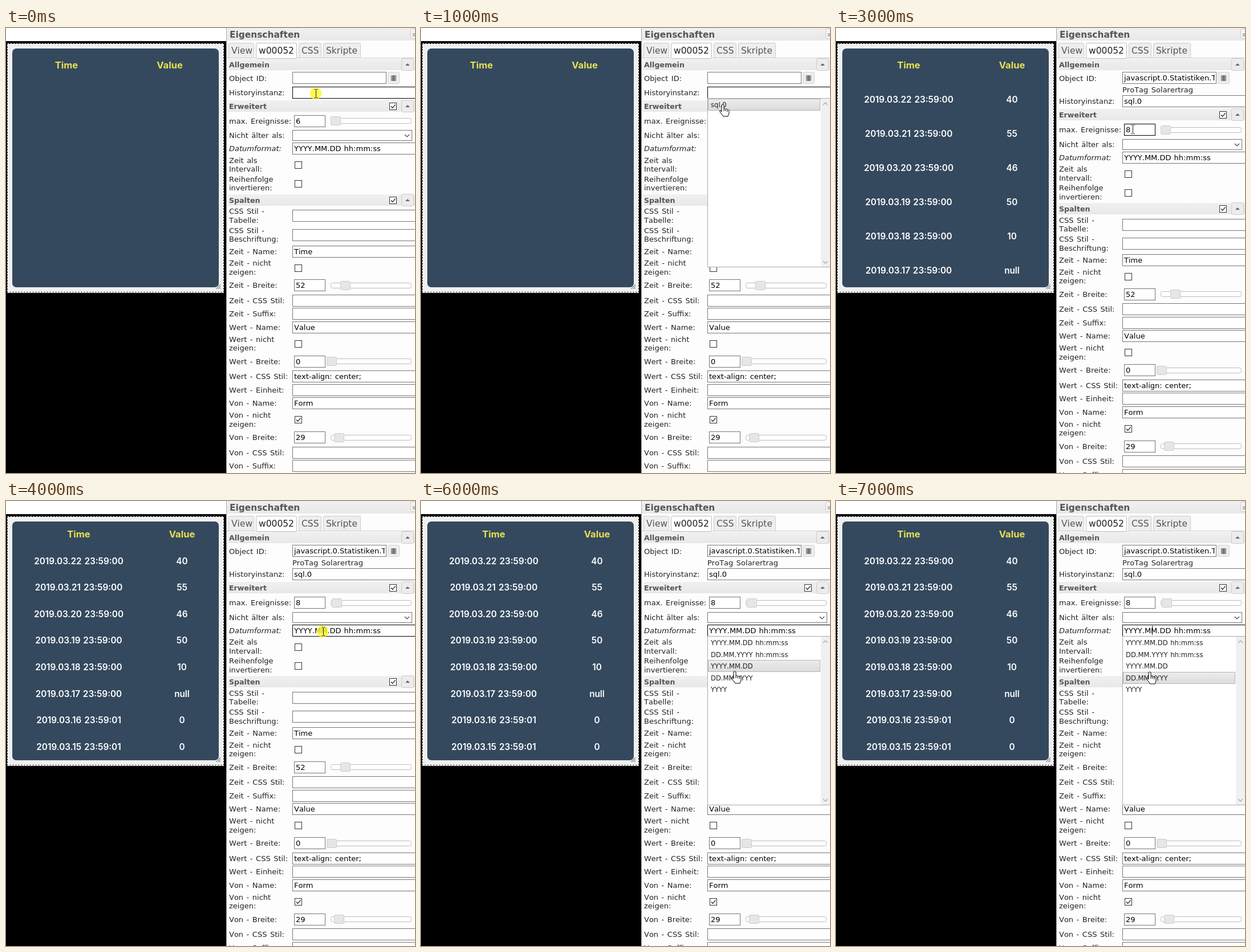
These frames come from a looping animation (717 px wide and 781 px high, 8 s). An HTML page:

```html
<!DOCTYPE html>
<html lang="de">
<head>
<meta charset="utf-8">
<title>Eigenschaften</title>
<style>
html, body { margin: 0; width: 100%; height: 100%; overflow: hidden; background: #000; }
svg { display: block; width: 717px; height: 781px; }
text { font: 13px "DejaVu Sans", sans-serif; font-kerning: none; fill: #222; word-spacing: 1px; white-space: pre; }
.label { word-spacing: 1.4px; }
.italic { font-style: italic; }
.input { fill: #000; }
.title { font-size: 15.4px; font-weight: bold; fill: #555; }
.section { font-size: 12.6px; font-weight: bold; fill: #555; }
.tab { font-size: 15.5px; fill: #555; }
.active { fill: #212121; }
.item { font-size: 11.6px; }
.cell { font: 600 15.3px Inter, sans-serif; fill: #fff; text-anchor: middle; }
.head { font: 700 16.5px Inter, sans-serif; fill: #e8e052; text-anchor: middle; }
.press { fill: #fcf630; fill-opacity: .8; }
</style>
</head>
<body>
<svg id="stage" viewBox="0 0 717 781"></svg>
<script>
const STEP = 1000;
const FORMATS = ["YYYY.MM.DD hh:mm:ss", "DD.MM.YYYY hh:mm:ss", "YYYY.MM.DD", "DD.MM.YYYY", "YYYY"];
const VALUES = [40, 55, 46, 50, 10, "null", 0, 0];

// One entry per second of the recording
const filled = { id: true, history: "sql.0" };
const eight = { ...filled, max: 8, rows: 8, knob: 571 };
const picking = { ...eight, focus: "date", items: FORMATS, menuY: 238 };
const states = [
  { focus: "history", press: [543, 115], beam: [543, 115] },
  { focus: "history", items: ["sql.0"], menuY: 124, pick: 0, hand: [528, 133] },
  { history: "sql.0", hover: true, beam: [158, 251, "#d9cbb8"] },
  { ...filled, max: 8, rows: 6, focus: "max", beam: [520, 178] },
  { ...eight, focus: "date", press: [555, 229], beam: [556, 229] },
  { ...picking, pick: 0, hand: [552, 269] },
  { ...picking, pick: 2, hand: [549, 298] },
  { ...picking, pick: 3, hand: [549, 299], caret: true }
];

const rect = (x, y, w, h, fill, stroke = "none", r = 0) =>
  `<rect x="${x}" y="${y}" width="${w}" height="${h}" rx="${r}" fill="${fill}" stroke="${stroke}"/>`;
const box = (x, y, w, h, fill, stroke, r) =>
  rect(x + .5, Math.round(y) + .5, w - 1, h - 1, fill, stroke, r);
const path = (d, stroke, fill = "none", width = 1) =>
  `<path d="${d}" fill="${fill}" stroke="${stroke}" stroke-width="${width}"/>`;
const text = (x, y, s, cls = "label") => `<text x="${x}" y="${Math.round(y)}" class="${cls}">${s}</text>`;

// Form controls are placed by their vertical centre
const label = (y, s, cls = "") => {
  const lines = s.split("|");
  return lines.map((line, i) =>
    text(391, y + 4.5 + (i - (lines.length - 1) / 2) * 15.5, line, "label " + cls)).join("");
};
const field = (y, value = "", focus) =>
  box(502, y - 10.5, 232, 21, "#fff", focus ? "#000" : "#767676") + text(505, y + 4.5, value, "input");
const check = (x, y, on) => {
  const mid = Math.round(y);
  return box(x, mid - 6, 13, 13, "#fff", "#333") +
    (on ? path(`M${x + 3} ${mid + .5}l2.6 2.8 5-6`, "#222", "none", 1.3) : "");
};
const slider = (y, value, knob, focus) =>
  box(505, y - 10.5, 55, 21, "#fff", focus ? "#000" : "#767676") + text(508, y + 4.5, value, "input") +
  box(569, y - 5, 142, 10, "#fff", "#bbb", 3) + box(knob, y - 8, 18, 16, "#e6e6e6", "#ccc", 2);
const section = (y, name, toggle) => {
  const mid = Math.round(y);
  return rect(390, mid - 10, 327, 20, "url(#bar)") + text(391, mid + 4.5, name, "section") +
    (toggle ? check(672, mid, true) : "") +
    box(693, mid - 11, 22, 22, "#ececec", "#ccc", 2) + path(`M700 ${mid + 2}h8l-4-4z`, "none", "#666");
};

function board({ rows }) {
  let out = rect(0, 0, 386, 23, "#fff") + rect(2, 27, 380, 438, "#f0eff0") +
    rect(2.5, 27.5, 379, 436, "none", "#000") +
    `<rect x="2.5" y="27.5" width="379" height="436" fill="none" stroke="#fff" stroke-dasharray="3 2"/>` +
    rect(11, 36, 362, 419, "#34495e", "none", 7) +
    path("M368 458l8-8M371 458l5-5M374 458l2-2", "#555");
  const count = rows || 0, gap = count === 8 ? 46.6 : 60;
  const top = count === 8 ? 58.5 : 65, timeX = count ? 127.5 : 106, valueX = count ? 308.5 : 287;
  out += text(timeX, top + 5.5, "Time", "head") + text(valueX, top + 5.5, "Value", "head");
  for (let i = 0; i < count; i++) {
    const y = top + gap * (i + 1) + 5.5;
    out += text(timeX, y, `2019.03.${22 - i} 23:59:0${i > 5 ? 1 : 0}`, "cell") + text(valueX, y, VALUES[i], "cell");
  }
  return out;
}

function header() {
  const tabs = [["View", 390, 45], ["w00052", 438, 72], ["CSS", 513, 40], ["Skripte", 556, 66]];
  return rect(387, 0, 330, 781, "#fdfdfd") + rect(386, 0, 1, 781, "#aaa") +
    rect(387, 0, 330, 22, "url(#bar)") + text(392, 16.5, "Eigenschaften", "title") +
    box(709, 1, 18, 18, "#f4f4f4", "#ccc", 2) + path("M713 10.5h4M713 13.5h4", "#888", "none", 1.5) +
    rect(387, 52, 330, 1, "#ccc") +
    tabs.map(([name, x, w], i) =>
      box(x, 26, w, i === 1 ? 28 : 27, i === 1 ? "#fff" : "#eee", i === 1 ? "#bbb" : "#ccc", 2) +
      text(x + 5, 45, name, i === 1 ? "tab active" : "tab")).join("");
}

function objectRow({ id, hover }) {
  return section(64, "Allgemein") + label(88, "Object ID:") +
    box(502, 77, 165, 21, "#fff", "#767676") +
    (id ? `<g clip-path="url(#idClip)">${text(505, 92, "javascript.0.Statistiken.Tag", "input")}</g>` +
      text(502, 113, "ProTag Solarertrag") : "") +
    box(669, 77, 21, 21, hover ? "#fff" : "#eee", hover ? "#bbb" : "#d0d0d0", 2) +
    rect(675, 83, 9, 10, hover ? "#222" : "#777") +
    path("M676.5 83v10M682.5 83v10", hover ? "#888" : "#bbb");
}

function form(state) {
  const { id, history, max = 6, knob = 569, focus } = state;
  const dy = id ? 15.5 : 0; // the object's name adds a line
  const selectY = Math.round(179 + dy);
  let out = objectRow(state) +
    label(113 + dy, "Historyinstanz:") + field(113 + dy, history, focus === "history") +
    section(136.5 + dy, "Erweitert", true) +
    label(163 + dy, "max. Ereignisse:") + slider(163 + dy, max, knob, focus === "max") +
    label(188.5 + dy, "Nicht älter als:") + box(502, selectY, 210, 19, "#fff", "#767676") +
    path(`M699 ${selectY + 8}l4 4 4-4`, "#444", "none", 1.2) +
    label(211.5 + dy, "Datumformat:", "italic") + field(211.5 + dy, FORMATS[0], focus === "date") +
    label(240 + dy, "Zeit als|Intervall:") + check(506, 240 + dy) +
    label(273 + dy, "Reihenfolge|invertieren:") + check(506, 273 + dy) +
    section(301.5 + dy, "Spalten", true);
  ["Tabelle", "Beschriftung"].forEach((name, i) => {
    const y = 329.5 + i * 33.5 + dy;
    out += label(y, `CSS Stil -|${name}:`) + field(y);
  });
  const groups = [
    ["Zeit", "Time", 52, 586, "", "Suffix"],
    ["Wert", "Value", 0, 562, "text-align: center;", "Einheit"],
    ["Von", "Form", 29, 575, "", "Suffix"]
  ];
  groups.forEach(([name, title, width, at, css, last], i) => {
    const y = 392 + i * 133.4 + dy;
    out += label(y, name + " - Name:") + field(y, title) +
      label(y + 28.5, name + " - nicht|zeigen:") + check(506, y + 28.5, name === "Von") +
      label(y + 59.7, name + " - Breite:") + slider(y + 59.7, width, at) +
      label(y + 86.3, name + " - CSS Stil:") + field(y + 86.3, css) +
      label(y + 109.8, `${name} - ${last}:`) + field(y + 109.8);
  });
  return out;
}

function menu({ items, menuY: y, pick }) {
  if (!items) return "";
  return box(502, y - 1, 230, 297, "#fff", "#aaa") + rect(701, y, 16, 295, "#f0f0f0") +
    path(`M705 ${y + 11}l4-4 4 4M705 ${y + 285}l4 4 4-4`, "#aaa", "none", 1.3) +
    items.map((item, i) => {
      const top = y + Math.round(i * 20.6);
      return (i === pick ? box(503, top, 197, 21, "url(#pick)", "#b5b5b5") : "") + text(508, top + 15, item, "item");
    }).join("");
}

function pointer({ press, beam, hand, caret }) {
  let out = "";
  if (press) out += `<circle class="press" cx="${press[0]}" cy="${press[1]}" r="10.5"/>`;
  if (beam) {
    const [x, y, color = "#222"] = beam;
    out += path(`M${x - 2.5} ${y - 7.5}h2l1 1 1-1h2M${x + .5} ${y - 7}v14M${x - 2.5} ${y + 7.5}h2l1-1 1 1h2`, color);
  }
  if (caret) out += rect(554, 219, 1, 16, "#000");
  if (hand) {
    out += `<g transform="translate(${hand})">` +
      path("M-1 2Q1 -.5 3 2V9Q5 7 6 9.5 8 8 9 10.5 12 9.5 12 13V17L10 22H2L-4 14Q-5 11-3 11.5L-1 14Z", "#000", "#fff") +
      path("M3 9v4M6 10v3M9 11v3", "#000") + "</g>";
  }
  return out;
}

const defs = `<defs>
  <linearGradient id="bar" x2="0" y2="1"><stop stop-color="#f0f0f0"/><stop offset="1" stop-color="#e8e8e8"/></linearGradient>
  <linearGradient id="pick" x2="0" y2="1"><stop stop-color="#ececec"/><stop offset="1" stop-color="#dcdcdc"/></linearGradient>
  <clipPath id="idClip"><rect x="503" y="78" width="161" height="19"/></clipPath>
</defs>`;

const stage = document.getElementById("stage");
const start = performance.now();
let shown = -1;

function tick(now) {
  const step = Math.floor(Math.max(0, now - start) / STEP) % states.length;
  if (step !== shown) {
    const s = states[step];
    stage.innerHTML = defs + rect(0, 0, 717, 781, "#000") + board(s) + header() + form(s) + menu(s) + pointer(s);
    shown = step;
  }
  requestAnimationFrame(tick);
}
tick(start);
</script>
</body>
</html>
```
